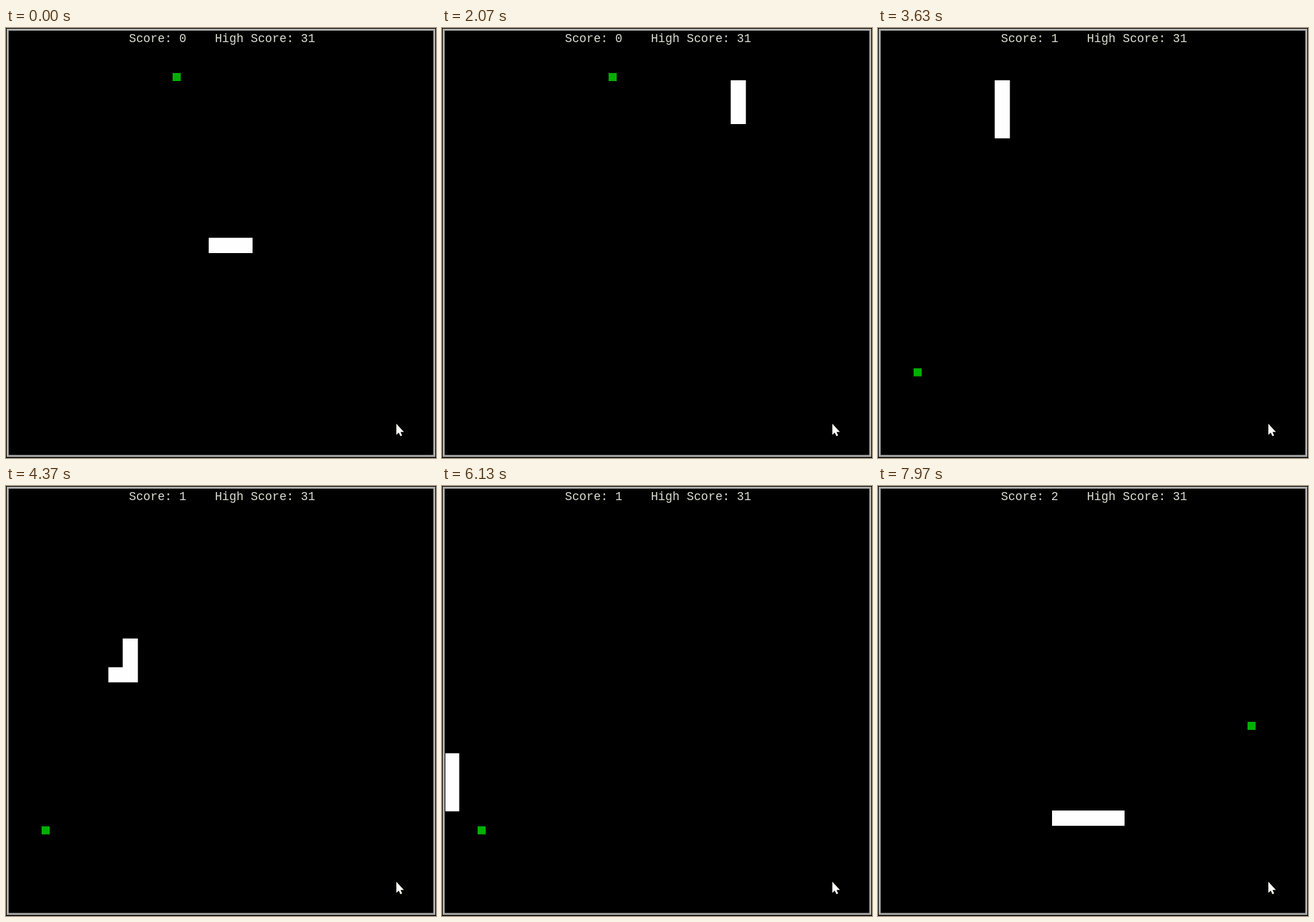
An HTML page that plays this animation: 640 px wide and 640 px high, repeating every 8 s.

```html
<!DOCTYPE html>
<html lang="en">
<head>
<meta charset="utf-8">
<title>Snake</title>
<style>
  html, body { margin: 0; width: 100%; height: 100%; overflow: hidden; background: #000; }
  svg { display: block; width: 100vw; height: 100vh; }
  text { font: 17.78px "Liberation Mono", "Courier New", monospace; fill: #deded0; white-space: pre; }
</style>
</head>
<body>
<svg viewBox="0 0 640 640">
  <rect width="640" height="640" fill="#000"/>
  <clipPath id="field"><rect x="5" y="5" width="630" height="630"/></clipPath>
  <rect id="food" width="12" height="12" fill="#00b000"/>
  <path id="snake" clip-path="url(#field)" fill="#fefefe"/>
  <rect x="2.5" y="2.5" width="635" height="634.5" fill="none" stroke="#acacaa" stroke-width="3"/>
  <text id="score" x="183" y="20.5" xml:space="preserve"></text>
  <path d="M581 589V605.5L584.6 602.2L587 607.6L589.6 606.5L587.2 601.2H592.2Z" fill="#fffffa"/>
</svg>
<script>
const LOOP = 8000;
const CAPTURE = 100 / 3;            // screen refresh, ms
const MOVE = 108.8, LEAD = 0.96;    // ms per move, share of the first move already over
const CELL = 64 / 3, SIZE = 22.6, LEFT = 301.7, TOP = 77.7;
const REACH = 20, START_LENGTH = 3;
const STEERING = "R8 U6 L2 U5 L12 D9 L8 D10 R16";
const STEP = { R: [1, 0], L: [-1, 0], U: [0, -1], D: [0, 1] };
const FOOD = [[248, 67], [53, 506.5], [550, 351]];

const snake = document.getElementById("snake");
const food = document.getElementById("food");
const score = document.getElementById("score");

const cellCorner = ([column, row]) => [LEFT + column * CELL, TOP + row * CELL];

const trail = [[0, 11]];
for (const run of STEERING.split(" ")) {
  const [dx, dy] = STEP[run[0]];
  for (let i = 0; i < +run.slice(1); i++) {
    const [x, y] = trail.at(-1);
    trail.push([x + dx, y + dy]);
  }
}

// Trail indices at which the head comes within reach of the current food
const meals = [];
trail.forEach((cell, i) => {
  const [x, y] = cellCorner(cell), [fx, fy] = FOOD[meals.length];
  if (Math.hypot(x + SIZE / 2 - fx - 6, y + SIZE / 2 - fy - 6) < REACH) meals.push(i);
});

function draw(time) {
  const shown = Math.floor((time + 5) / CAPTURE) * CAPTURE;
  const head = Math.floor(shown / MOVE + LEAD) + START_LENGTH - 1;
  const eaten = meals.filter(m => head >= m).length;
  const length = START_LENGTH + meals.filter(m => head > m).length;

  snake.setAttribute("d", trail.slice(head - length + 1, head + 1)
    .map(cell => `M${cellCorner(cell)}h${SIZE}v${SIZE}h-${SIZE}z`).join(""));
  food.setAttribute("x", FOOD[eaten][0]);
  food.setAttribute("y", FOOD[eaten][1]);
  score.textContent = `Score: ${eaten}    High Score: 31`;
}

const start = performance.now();
function tick() {
  draw((performance.now() - start) % LOOP);
  requestAnimationFrame(tick);
}
tick();
</script>
</body>
</html>
```
